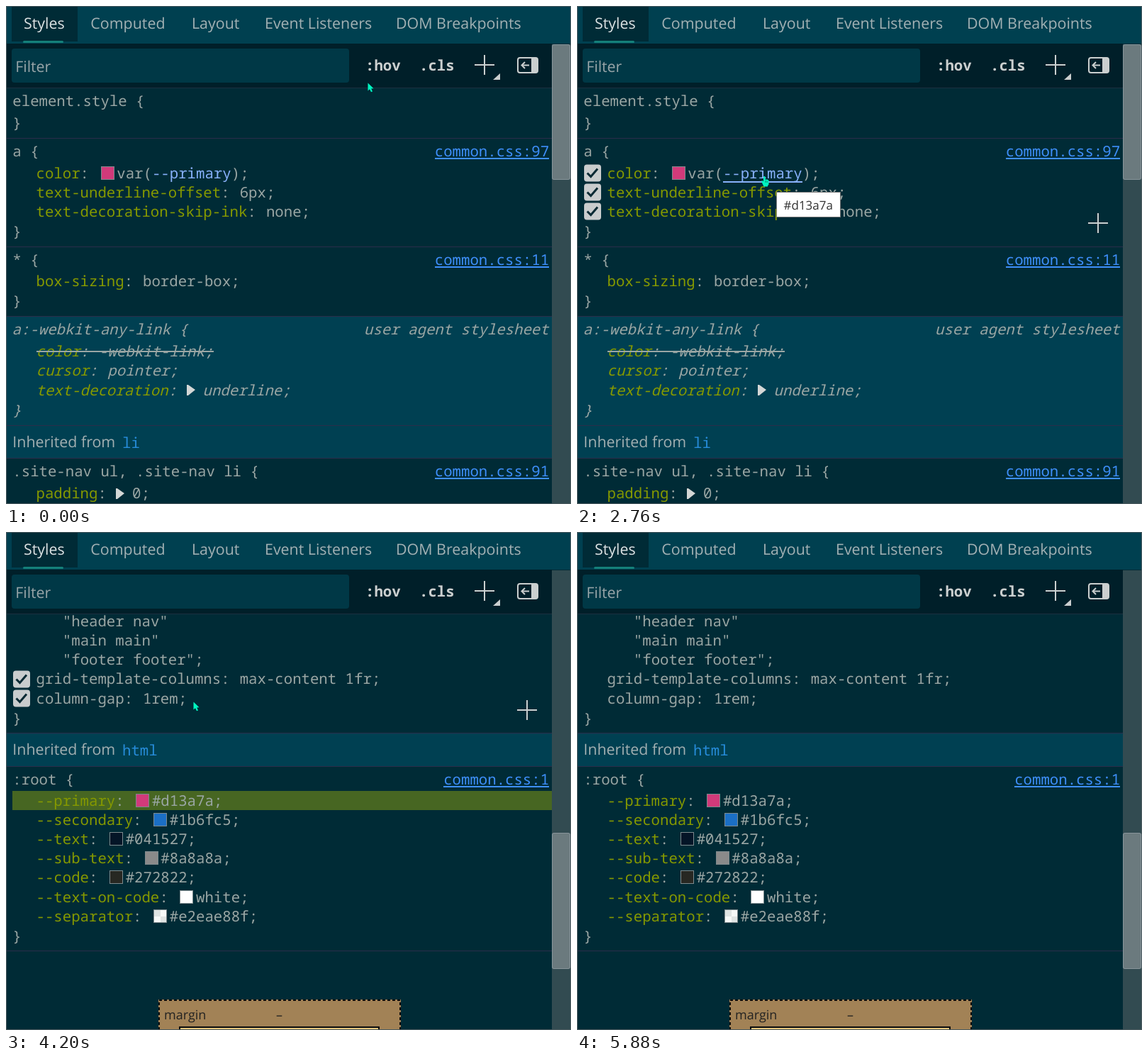
Animation, 797 px wide and 702 px high, one loop 6.56 s. Source, as an HTML page with a canvas:

```html
<!DOCTYPE html>
<html lang="en">
<head>
<meta charset="utf-8">
<title>Styles pane</title>
<style>
  html, body { margin: 0; width: 100%; height: 100%; overflow: hidden; background: #002b36; }
  canvas { display: block; }
</style>
</head>
<body>
<canvas id="stage" width="797" height="702"></canvas>
<script>
const ctx = document.getElementById('stage').getContext('2d');
const LOOP = 6560;
const ADV = 12.42; // advance of one monospace character
const GAP = 1.5;   // extra space before a property value
const MONO = '20.7px "Noto Sans Mono", monospace';
const UI = 'px "Open Sans", "Noto Sans", sans-serif';
const C = {
  base: '#002b36', panel: '#004052', tool: '#001f29', input: '#003846',
  line: '#2b2d4a', text: '#9aa6a4', prop: '#859900', link: '#3e8ffa',
  name: '#88b0fa', tag: '#268bd8', icon: '#cbcfcf', flash: '#879c12',
  cursor: '#00f5c0'
};

const FLASH = [[3660, 1], [3810, .9], [3930, .78], [4050, .66], [4200, .53], [4350, .35], [4770, .03], [5430, 0]];
// time, x, y of the pointer
const POINTER = [
  [0, 510, 108], [1400, 502, 112], [1520, 488, 122], [1670, 430, 150],
  [1820, 368, 170], [1970, 309, 187], [2120, 287, 209], [2240, 270, 230],
  [2360, 264, 239], [5280, 281, 258], [5430, 350, 357], [5580, 530, 510],
  [5730, 687, 668]
];

const latest = (steps, t) => steps.filter(s => s[0] <= t).pop();

function rect(x, y, w, h, color) {
  ctx.fillStyle = color;
  ctx.fillRect(x, y, w, h);
}

function round(x, y, w, h, r, color) {
  ctx.fillStyle = color;
  ctx.beginPath();
  ctx.roundRect(x, y, w, h, r);
  ctx.fill();
}

function poly(points, color) {
  ctx.fillStyle = color;
  ctx.beginPath();
  points.forEach(([x, y]) => ctx.lineTo(x, y));
  ctx.fill();
}

function stroke(points, color, width) {
  ctx.strokeStyle = color;
  ctx.lineWidth = width;
  ctx.beginPath();
  points.forEach(([x, y]) => ctx.lineTo(x, y));
  ctx.stroke();
}

function write(text, x, y, color, font) {
  ctx.font = font;
  ctx.fillStyle = color;
  ctx.fillText(text, x, y);
}

const ui = (text, x, y, color, size = 21.4) => write(text, x, y, color, size + UI);
const code = (text, x, y, color = C.text, style = '') => write(text, x, y, color, style + MONO);

function prop(name, value, y, style = '', color = C.prop) {
  const x = 42.5, end = x + name.length * ADV;
  code(name, x, y, color, style);
  code(':', end, y, C.text, style);
  code(value, end + 2 * ADV + GAP, y, C.text, style);
}

function swatch(x, y, color) {
  rect(x, y - 17, 19, 19, '#7d8a8d');
  rect(x + 1, y - 16, 17, 17, color);
}

// A property whose value follows a colour swatch; returns the swatch's and value's x
function colorProp(name, color, y) {
  prop(name, '', y);
  const x = 42.5 + (name.length + 2) * ADV;
  const sx = Math.round(x + 4.1);
  swatch(sx, y, color);
  return [sx, x + 26.8];
}

function link(text, y) {
  const w = text.length * ADV, x = 766.2 - w;
  code(text, x, y, C.link);
  rect(Math.round(x), y + 2, Math.round(w), 2, C.link);
}

function expander(x, y) {
  poly([[x, y - 15], [x + 2, y - 15], [x + 12, y - 8], [x + 2, y], [x, y]], '#d4d7d6');
}

function checkbox(cy) {
  round(10, cy - 12, 24, 24, 4, '#c9cccd');
  stroke([[14.5, cy], [19.5, cy + 5], [29, cy - 6]], '#0b2a34', 3);
}

function plus(x, y) {
  rect(x - 14, y - 1, 28, 2, C.icon);
  rect(x - 1, y - 14, 2, 28, C.icon);
}

const divider = y => rect(1, y, 769, 1, C.line);

function inherited(top, bottom, tag) {
  rect(1, top, 769, bottom - top, C.panel);
  divider(top);
  divider(bottom);
  ui('Inherited from', 9.3, top + 31, '#a2afb1');
  code(tag, 164, top + 32, C.tag);
}

function topRules(hover, over) {
  code('element.style {', 9.3, 141);
  code('}', 9.3, 172);
  divider(186);

  code('a {', 9.3, 212);
  link('common.css:97', 212);
  const [, x] = colorProp('color', '#d13a7a', 243);
  code('var(', x, 243);
  code('--primary', x + 4 * ADV, 243, C.name);
  code(');', x + 13 * ADV, 243);
  prop('text-underline-offset', '6px;', 270);
  prop('text-decoration-skip-ink', 'none;', 297);
  code('}', 9.3, 325);
  if (hover) {
    [235.5, 262.5, 289.5].forEach(checkbox);
    plus(735, 306);
  }
  if (over) rect(206, 247, 112, 2, C.name);
  divider(339);

  code('* {', 9.3, 365);
  link('common.css:11', 365);
  prop('box-sizing', 'border-box;', 395);
  code('}', 9.3, 423);

  const it = 'italic ';
  rect(1, 437, 769, 154, C.panel);
  divider(437);
  code('a:-webkit-any-link {', 8.5, 463, C.text, it);
  code('user agent stylesheet', 505, 463, C.text, it);
  prop('color', '-webkit-link;', 494, it);
  rect(43, 486, 250, 2, C.text);
  prop('cursor', 'pointer;', 521, it);
  prop('text-decoration', '', 549, it);
  expander(255, 549);
  code('underline;', 277.5, 549, C.text, it);
  code('}', 9.3, 577, C.text, it);

  inherited(591, 637, 'li');
  code('.site-nav ul, .site-nav li {', 9.3, 663);
  link('common.css:91', 663);
  prop('padding', '', 694);
  expander(155, 695);
  code('0;', 178, 694);
}

const VARS = [
  ['--primary', '#d13a7a'], ['--secondary', '#1b6fc5'], ['--text', '#041527'],
  ['--sub-text', '#8a8a8a'], ['--code', '#272822'], ['--text-on-code', 'white'],
  ['--separator', '#e2eae88f']
];

function bottomRules(t) {
  ['"header nav"', '"main main"', '"footer footer";'].forEach((s, i) => code(s, 79.8, 133 + i * 27));
  prop('grid-template-columns', 'max-content 1fr;', 214, '', C.text);
  prop('column-gap', '1rem;', 242, '', C.text);
  code('}', 9.3, 270);
  if (t < 5430) {
    checkbox(207.5);
    checkbox(234.5);
    plus(735, 251);
  }
  inherited(283, 330, 'html');

  code(':root {', 9.3, 356);
  link('common.css:1', 356);
  ctx.globalAlpha = latest(FLASH, t)[1];
  rect(9, 365, 761, 27, C.flash);
  ctx.globalAlpha = 1;

  const hover = t >= 5580 && t < 5730;
  VARS.forEach(([name, value], i) => {
    const y = Math.round(386 + i * 27.1);
    const checker = name === '--separator';
    const [sx, x] = colorProp(name, checker ? '#f6f8f7' : value, y);
    if (checker) {
      const dark = t < 3810 ? '#c8c8c8' : '#dfe4e3';
      rect(sx + 1, y - 16, 9, 9, dark);
      rect(sx + 10, y - 7, 8, 8, dark);
    }
    code(value + ';', x, y);
    if (hover) checkbox(y - 7.5);
  });
  if (hover) plus(735, 558);
  code('}', 9.3, 577);
  divider(590);

  // Box model
  rect(215, 659, 342, 43, '#a28256');
  ctx.setLineDash([4, 3]);
  stroke([[216, 702], [216, 660], [556, 660], [556, 702]], '#0c0c0c', 2);
  ctx.setLineDash([]);
  rect(244, 697, 283, 5, '#0c0c0c');
  rect(246, 699, 279, 3, '#e5c77f');
  ui('margin', 223, 687, '#222', 18);
  ui('–', 381, 687, '#222', 18);
}

function header() {
  rect(0, 0, 797, 53, '#004050');
  rect(8, 1, 93, 48, C.base);
  rect(8, 49, 93, 1, C.base);
  round(24, 49, 57, 3, 1.5, '#15807a');
  ui('Styles', 25, 32, '#dde2e3');
  [['Computed', 119.3], ['Layout', 262], ['Event Listeners', 365], ['DOM Breakpoints', 550]]
    .forEach(([s, x]) => ui(s, x, 32, '#a3b1b4'));

  rect(0, 53, 770, 62, C.tool);
  rect(0, 115, 770, 1, '#1c3040');
  round(8, 60, 476, 48, 4, C.input);
  ui('Filter', 13.2, 93, '#98a5a8');
  code(':hov', 507, 91, C.icon, 'bold ');
  code('.cls', 583, 91, C.icon, 'bold ');
  plus(675, 83);
  poly([[697, 95], [697, 104], [687, 104]], C.icon);

  // Sidebar toggle
  ctx.strokeStyle = C.icon;
  ctx.lineWidth = 2;
  ctx.beginPath();
  ctx.roundRect(722, 73, 28, 21, 3);
  ctx.stroke();
  rect(741, 73, 9, 21, C.icon);
  stroke([[738, 83.5], [728, 83.5]], C.icon, 2);
  stroke([[732, 79], [727.5, 83.5], [732, 88]], C.icon, 2);
}

function scrollbar(top, bottom) {
  rect(770, 54, 27, 648, '#324b51');
  round(770, top, 26, bottom - top, 3, '#87949a');
  round(771, top + 1, 24, bottom - top - 2, 2, '#6b7a7e');
}

function tooltip() {
  rect(281, 262, 91, 36, '#767676');
  rect(282, 263, 89, 34, '#fff');
  ui('#d13a7a', 291.5, 287, '#333', 17);
}

function pointer(t) {
  if (t >= 5880) return;
  const [, x, y] = latest(POINTER, t);
  ctx.save();
  ctx.translate(x, y);
  if (t >= 2240 && t < 3660) {
    round(-1, 1, 2.6, 10, 1.3, C.cursor);
    round(-1, 5.5, 7.5, 8.5, 2.5, C.cursor);
    poly([[-4, 8], [-2.5, 7], [0, 9.5], [5.5, 9], [5, 15.5], [-.5, 15.5]], C.cursor);
    stroke([[2, 7], [2, 10]], '#06584f', .7);
    stroke([[4.2, 7.5], [4.2, 10]], '#06584f', .7);
  } else {
    poly([[.5, .5], [.5, 11.5], [3, 9.3], [5, 13.3], [7, 12.4], [5.2, 8.6], [8.5, 8.3]], C.cursor);
  }
  ctx.restore();
}

function draw(t) {
  const jumped = t >= 3660;
  rect(0, 0, 797, 702, C.base);
  if (jumped) bottomRules(t);
  else topRules(t >= 1970, t >= 2240);
  header();
  if (jumped) scrollbar(424, t < 3810 ? 617 : 616);
  else scrollbar(54, 245);
  if (t >= 2760 && !jumped) tooltip();

  const edge = '#4b5a5f';
  rect(0, 0, 797, 1, edge);
  rect(0, 0, 1, 702, edge);
  rect(796, 0, 1, 702, edge);
  rect(0, 701, 797, 1, edge);
  pointer(t);
}

ctx.textRendering = 'geometricPrecision';
const start = performance.now();
function tick() {
  draw((performance.now() - start) % LOOP);
  requestAnimationFrame(tick);
}
tick();
</script>
</body>
</html>
```
